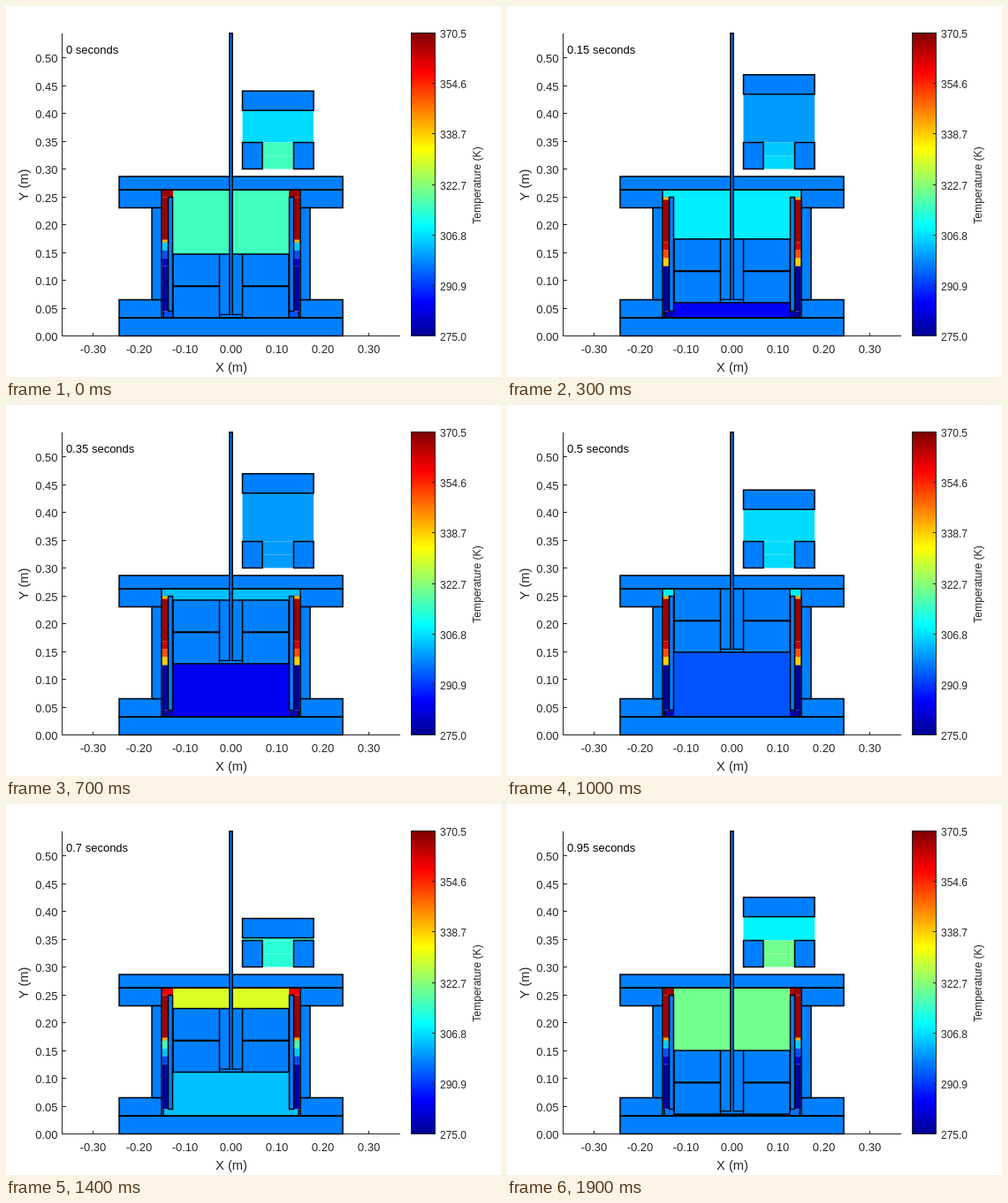
Write an HTML page with a canvas that moves like this. It is 560 px wide and 420 px high and loops after 2000 ms.

```html
<!DOCTYPE html>
<html lang="en">
<head>
<meta charset="utf-8">
<title>Engine temperature</title>
<style>
html, body { margin: 0; width: 100%; height: 100%; overflow: hidden; background: #fff; }
canvas { display: block; }
</style>
</head>
<body>
<canvas id="stage" width="560" height="420"></canvas>
<script>
const ctx = document.getElementById('stage').getContext('2d');
const STEPS = 20, STEP_MS = 100;
const MID = 255;
const INK = '#262626';
const HEATER = 61, COOLER = 1;
const clamp = v => Math.max(0, Math.min(1, v));
const mix = (from, to, t) => from + (to - from) * t;

// Jet colour map, level 0 (coldest) to 63 (hottest)
function jet(level) {
  const ramp = peak => Math.round(255 * clamp(1.5 - Math.abs(level + 1 - peak) / 16));
  return `rgb(${ramp(48)},${ramp(32)},${ramp(16)})`;
}
const METAL = jet(15);

// Pose and colour levels of the machine at one step of the cycle
function stateAt(step) {
  const a = step / STEPS * 2 * Math.PI;
  const sin = Math.sin(a), cos = Math.cos(a), cos2 = Math.cos(2 * a);
  const top = 243.7 + 36.5 * cos + 1.2 * cos2 - 0.6 * sin;
  const hot = 27 - 9 * sin + 2.5 * cos - 2.5 * cos2;
  const cold = 12.2 - 7.2 * sin;
  const work = 20.8 - 5 * sin;
  const upflow = clamp(((step || STEPS) - 10) / 5);
  const inflow = clamp(0.15 + cos);
  return {
    top, bottom: top + 72,
    pistonTop: 100.2 - 28.4 * sin - 3.5 * cos2,
    hot, cold, work, upflow,
    strip: mix(hot, HEATER, upflow),
    drain: upflow > 0 ? cold : 2,
    portTop: mix(work, hot, inflow * inflow),
    portLow: mix(work, hot, inflow)
  };
}

function fill(x0, y0, x1, y1, color) {
  ctx.fillStyle = color;
  ctx.fillRect(x0, y0, x1 - x0, y1 - y0);
}

function line(x0, y0, x1, y1, width = 1.5, color = '#000') {
  ctx.strokeStyle = color;
  ctx.lineWidth = width;
  ctx.beginPath();
  ctx.moveTo(x0, y0);
  ctx.lineTo(x1, y1);
  ctx.stroke();
}

function part(x0, y0, x1, y1) {
  fill(x0, y0, x1, y1, METAL);
  ctx.strokeStyle = '#000';
  ctx.lineWidth = 1.5;
  ctx.strokeRect(x0, y0, x1 - x0, y1 - y0);
}

function bothSides(draw, x0, y0, x1, y1, color) {
  draw(x0, y0, x1, y1, color);
  draw(2 * MID - x1, y0, 2 * MID - x0, y1, color);
}

function text(str, x, y, size, align = 'left', color = INK, turned = false) {
  ctx.save();
  ctx.translate(x, y);
  if (turned) ctx.rotate(-Math.PI / 2);
  ctx.font = `${size}px "Liberation Sans", Arial, sans-serif`;
  ctx.textAlign = align;
  ctx.fillStyle = color;
  ctx.fillText(str, 0, size * 0.36);
  ctx.restore();
}

function drawAxes() {
  line(63.5, 31, 63.5, 374, 1, INK);
  line(63, 373.5, 446, 373.5, 1, INK);
  for (let k = 0; k <= 10; k++) {
    const y = Math.round(374 - 31.5 * k) - 0.5;
    line(64, y, 68, y, 1, INK);
    text((k * 0.05).toFixed(2), 58.5, y + 0.5, 13, 'right');
  }
  for (let k = -3; k <= 3; k++) {
    const x = 254.5 + 52 * k;
    line(x, 370, x, 374, 1, INK);
    text((k / 10).toFixed(2), x, 388, 13, 'center');
  }
  text('X (m)', 255, 409, 14.7, 'center');
  text('Y (m)', 20, 202.5, 14.7, 'center', INK, true);
}

function drawColorbar() {
  for (let y = 31; y < 374; y++) {
    fill(459, y, 486, y + 1, jet(63 * (373 - y) / 342));
  }
  ctx.strokeStyle = INK;
  ctx.lineWidth = 1;
  ctx.strokeRect(458.5, 30.5, 27, 343);
  for (let k = 0; k <= 6; k++) {
    const y = Math.round(374 - k * 343 / 6) - 0.5;
    line(482, y, 486, y, 1, INK);
    text((275 + k * 95.48 / 6).toFixed(1), 491, y + 0.7, 12);
  }
  text('Temperature (K)', 533, 203, 12.1, 'center', INK, true);
}

function drawGas(s) {
  fill(189, 208, 321, s.top, jet(s.hot));
  fill(189, s.bottom, 321, 353, jet(s.cold));

  // Heater, three regenerator cells and cooler in the side gaps
  const band = (y0, y1, level, right = 184) =>
    bothSides(fill, 177, y0, right, y1, jet(level));
  band(217, 268, HEATER);
  for (let n = 0; n < 3; n++) {
    band(268 + 9 * n, 277 + 9 * n, 58 - 8 * n - 38 * s.upflow);
  }
  band(295, 346, COOLER);
  band(208, 217, s.strip, 189.5);
  band(346, 353, s.drain, 189.5);
  const front = s.upflow < 0.5 ? 217 : 265;
  band(front, front + 3, 44);
}

function drawDisplacer({ top, bottom }) {
  part(189.5, top, 320.5, bottom);
  bothSides(line, 189.5, top + 36, 242, top + 36);
  bothSides(line, 189.5, top + 36.7, 242, top + 36.7);
  bothSides(line, 242, top, 242, bottom);
  line(242, bottom - 3.5, 268, bottom - 3.5, 1.2);
}

function drawHousing() {
  part(128.5, 193.5, 381.5, 208.5);
  part(128.5, 353.5, 381.5, 374);
  bothSides(part, 128.5, 208.5, 176.5, 229);
  bothSides(part, 128.5, 333, 176.5, 353.5);
  bothSides(part, 165.5, 229, 176.5, 333);
  bothSides(part, 184, 217, 189, 346);
  bothSides(line, 178.5, 346, 178.5, 353);
  line(128.5, 208.5, 381.5, 208.5, 2.2);
  line(128.5, 353.5, 381.5, 353.5, 2.2);
}

function drawPowerCylinder(s) {
  const bottom = s.pistonTop + 22;
  fill(268, bottom, 348.5, 155, jet(s.work));
  fill(290, 155, 326, 170, jet(s.portTop));
  fill(290, 170, 326, 185, jet(s.portLow));
  part(268, 155, 290.5, 185);
  part(326, 155, 348.5, 185);
  part(268, s.pistonTop, 348.5, bottom);
}

function drawRod(bottom) {
  fill(253.5, 31, 257, bottom, METAL);
  bothSides(line, 253.4, 31, 253.4, bottom);
  line(252.7, 31.5, 257.3, 31.5);
}

function draw(step) {
  const s = stateAt(step);
  fill(0, 0, 560, 420, '#fff');
  drawAxes();
  drawColorbar();
  text(`${Number((step * 0.05).toFixed(2))} seconds`, 68, 49.5, 13, 'left', '#000');

  ctx.save();
  ctx.translate(-0.5, -0.5);
  drawGas(s);
  drawDisplacer(s);
  drawHousing();
  drawPowerCylinder(s);
  drawRod(s.bottom - 3.5);
  ctx.restore();
}

const start = performance.now();
let shown = -1;
function tick() {
  const step = Math.floor((performance.now() - start) / STEP_MS) % STEPS;
  if (step !== shown) draw(shown = step);
  requestAnimationFrame(tick);
}
tick();
</script>
</body>
</html>
```
